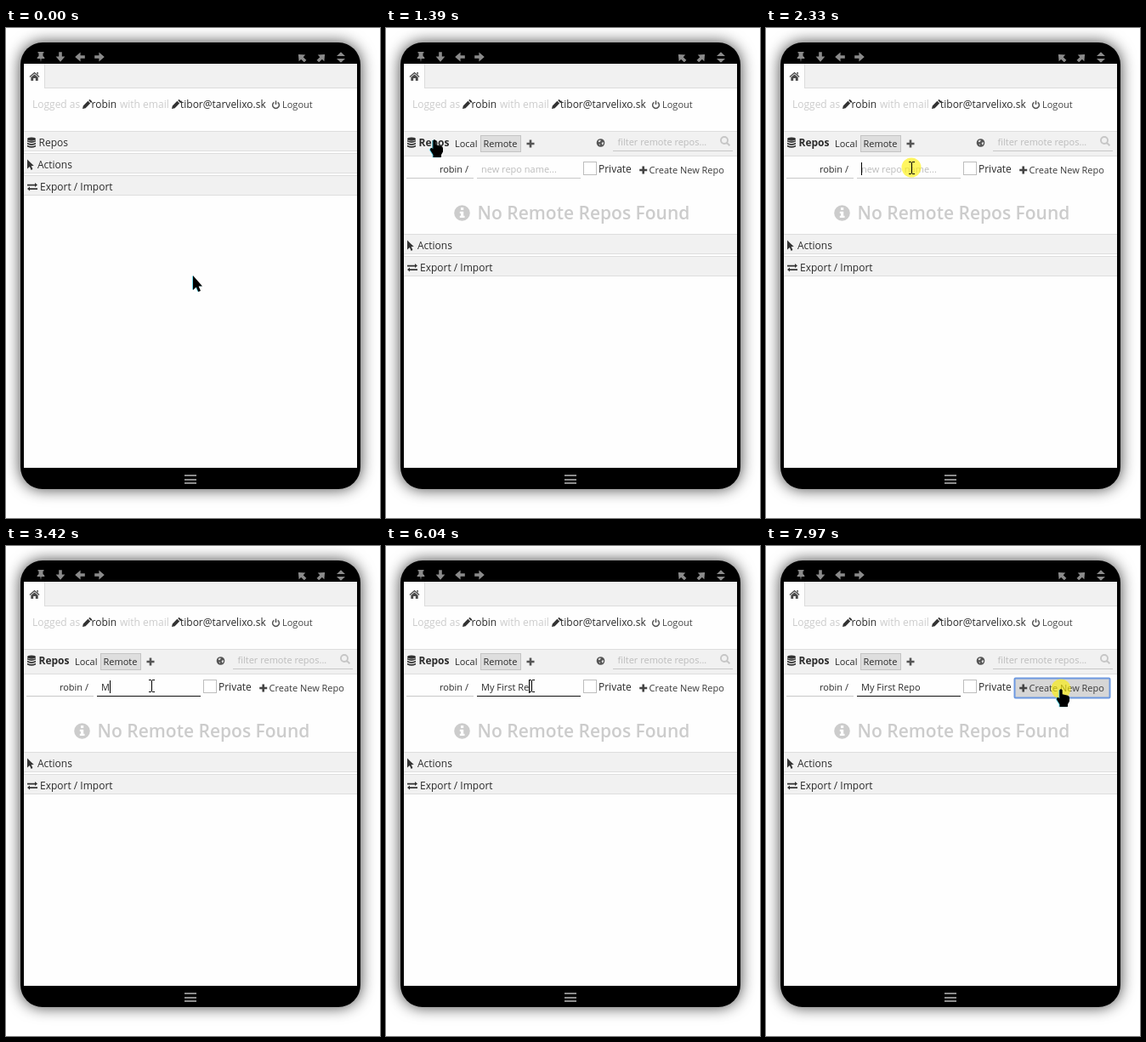
Animation of 440 by 576 pixels, one loop 8000 ms. Source, as an HTML page:

```html
<!DOCTYPE html>
<html lang="en">
<head>
<meta charset="utf-8">
<title>Repo panel</title>
<style>
  html, body { margin: 0; width: 100%; height: 100%; overflow: hidden; background: #fff; }
  svg { display: block; width: 440px; height: 576px; }
  text { font: 12px "Open Sans", sans-serif; white-space: pre; fill: #2b2b2b; }
  .s { font-size: 11px; }
  .b { font-weight: 700; }
  .pale { fill: #ccc; }
  .hint { fill: #bcbcbc; }
  .big { font-size: 21px; font-weight: 600; fill: #ccc; }
  .icon { fill: #333; }
  .bar { fill: #8b8b8b; }
  .crisp { shape-rendering: crispEdges; }
</style>
</head>
<body>
<svg viewBox="0 0 440 576" xmlns="http://www.w3.org/2000/svg">
  <defs>
    <filter id="glow" x="-20%" y="-20%" width="140%" height="140%">
      <feDropShadow dx="0" dy="0" stdDeviation="9" flood-color="#000" flood-opacity=".75"/>
    </filter>
    <path id="down" d="M-1.8-5.8h3.6v5.2H5.4L0 5.8-5.4-.6h3.6z"/>
    <path id="pencil" d="M-5 5l.8-3.6 5.6-5.6L4.2-1.4-1.4 4.2zM2.2-4.9l.9-.8q.6-.4 1.2.1l1.6 1.6q.5.6 0 1.2l-.9.9z"/>
    <path id="plus" d="M-1.3-4.5h2.6v3.2h3.2v2.6H1.3v3.2h-2.6V1.3h-3.2v-2.6h3.2z"/>
    <path id="band" d="M0 3.4q5 2.8 10 0v1.7q-5 2.8-10 0z"/>
    <g id="head" class="crisp">
      <rect x="21" width="392" height="24" fill="#f1f1f1"/>
      <path d="M21 .5h392M21 23.5h392" stroke="#dedede"/>
    </g>
    <path id="arrowShape" d="M0 0V17L3.8 13.4 6.3 19 9 17.9 6.6 12.4H11z"/>
    <path id="handShape" d="M-1.7 1.4Q0-.8 1.7 1.4V6.3L8 7.7Q10 8.3 10 10.5V14.5L8 18V21H-1.5V18L-5 12.4Q-5.3 9.4-3 10L-1.7 11.3z"/>
  </defs>

  <rect width="440" height="576" fill="#fff"/>
  <rect x="17" y="17" width="400" height="525" rx="26" filter="url(#glow)"/>
  <rect x="21" y="42" width="392" height="475" fill="#fefefe"/>

  <g class="bar">
    <path transform="translate(41 34)" d="M-3.5-6h7v1.5h-1v3.5q2 1 2 3H.7L0 6-.7 2H-4.5q0-2 2-3v-3.5h-1z"/>
    <use href="#down" transform="translate(64 34)"/>
    <use href="#down" transform="translate(87 34) rotate(90)"/>
    <use href="#down" transform="translate(110 34) rotate(-90)"/>
    <use href="#down" transform="translate(348 35) rotate(135)"/>
    <use href="#down" transform="translate(371 35) rotate(225)"/>
    <path transform="translate(394 34.5)" d="M-5-1.5L0-6.2 5-1.5zM-5 1.5H5L0 6.2z"/>
    <path d="M210 525h14v2h-14zM210 530h14v2h-14zM210 534h14v2h-14z"/>
  </g>

  <g class="crisp">
    <rect x="21" y="42" width="392" height="29" fill="#f1f1f1"/>
    <path d="M46 70.5H413M45.5 42V71" stroke="#dcdcdc"/>
    <rect x="21" y="42" width="24" height="29" fill="#fefefe"/>
  </g>
  <path transform="translate(33.5 57)" fill="#4a4a4a" d="M0-5.2l6 5.2-.8 1L0-3.5-5.2 1-6 0zM-4.2 1L0-2.6 4.2 1v4H1.3V2h-2.6v3h-2.9zM2.8-5h1.5v3L2.8-3.4z"/>

  <text class="pale" x="31" y="94">Logged as</text>
  <use href="#pencil" class="icon" x="95" y="90"/>
  <text x="100.5" y="94">robin</text>
  <text class="pale" x="134" y="94">with email</text>
  <use href="#pencil" class="icon" x="200" y="90"/>
  <text x="205" y="94">tibor@tarvelixo.sk</text>
  <path transform="translate(317.5 90.5)" d="M-2.2-3.2a3.9 3.9 0 1 0 4.4 0M0-5v4.6" fill="none" stroke="#555" stroke-width="1.5"/>
  <text class="s" x="325" y="94" style="fill:#444">Logout</text>

  <use id="shut" href="#head" y="121"/>
  <g id="panel">
    <g class="crisp">
      <rect x="21" y="121" width="392" height="30" fill="#f1f1f1"/>
      <path d="M21 121.5H413M21 150.5H413" stroke="#dedede"/>
      <path d="M267 144.5H408M24 176.5H103" stroke="#c8c8c8"/>
      <path id="line" d="M107 176.5H229"/>
      <rect id="remote" x="111.5" y="126.5" width="47" height="19" stroke="#c4c4c4"/>
      <rect x="232.5" y="157.5" width="15" height="15" fill="#fff" stroke="#bdbdbd"/>
    </g>
    <rect id="create" x="292.5" y="155.5" width="112" height="23" rx="1"/>
    <text class="s" x="81" y="140">Local</text>
    <text class="s" x="114.5" y="140">Remote</text>
    <use href="#plus" x="170" y="136" fill="#555"/>
    <g transform="translate(252.5 135)">
      <circle r="4.8" fill="#555"/>
      <path d="M-2.6-2.6l2-.8 1 1-1.6 1.6-1.4-.2zM1 .2l2-1.4.6 2-1.4 2zM-2 1.2l1.6.4-.6 1.6z" fill="#ddd"/>
    </g>
    <text class="s hint" x="272.5" y="138">filter remote repos...</text>
    <path d="M402 132a4 4 0 1 1-8 0 4 4 0 1 1 8 0M400.8 134.8l3.6 3.4" fill="none" stroke="#c6c6c6" stroke-width="1.9"/>
    <text class="s" x="97" y="170" text-anchor="end">robin /</text>
    <text class="s hint" id="hint" x="112" y="170">new repo name...</text>
    <text class="s" id="typed" x="112" y="170"></text>
    <rect class="crisp" id="caret" y="158" width="1" height="15"/>
    <text x="250" y="170">Private</text>
    <use href="#plus" x="302.7" y="167" fill="#444"/>
    <text class="s" x="309.5" y="171" style="fill:#3a3a3a">Create New Repo</text>
    <circle cx="89.5" cy="217.5" r="9.3" fill="#ccc"/>
    <path d="M88 211h3.2v3H88zM86.8 215.8h4.4v5h1.3v2.2h-5.7v-2.2H88v-2.8h-1.2z" fill="#fff"/>
    <text class="big" x="107.5" y="225">No Remote Repos Found</text>
  </g>

  <g class="icon" transform="translate(25 128.5)">
    <ellipse cx="5" cy="2.1" rx="5" ry="2.1"/>
    <use href="#band"/><use href="#band" y="2.9"/><use href="#band" y="5.8"/>
  </g>
  <text id="title" x="38.5" y="139">Repos</text>

  <g id="rest">
    <use href="#head" y="147"/>
    <path class="icon" transform="translate(25 154.5)" d="M0 0l7.8 7.6H4.7l1.7 4-1.8.8-1.7-4L0 11z"/>
    <text x="37" y="165">Actions</text>
    <use href="#head" y="173"/>
    <path class="icon" transform="translate(25 182)" d="M0 1.7h9V0l3 2.5L9 5V3.5H0zM12 6.2H3V4.6L0 7.1l3 2.5V8h9z"/>
    <text x="40" y="191">Export / Import</text>
  </g>

  <g id="mouse">
    <circle id="spot" r="11.5" fill="#fff000" fill-opacity=".62"/>
    <g id="arrow"><use href="#arrowShape" x="-.9" fill="#5fd6ea"/><use href="#arrowShape"/></g>
    <g id="hand"><use href="#handShape" x="-.9" y=".3" fill="#5fd6ea"/><use href="#handShape"/></g>
    <path id="beam" class="crisp" d="M-3-6.5H0M1-6.5H4M.5-6V7M-3 7.5H0M1 7.5H4" stroke="#000" fill="none"/>
  </g>
</svg>
<script>
const LOOP = 8000, STEP = 76.7;
const ui = {};
document.querySelectorAll('[id]').forEach(el => ui[el.id] = el);

const NAME = 'My First Repo';
const KEYS = [3420, 3660, 4130, 4590, 4750, 4810, 5040, 5210, 5500, 5820, 6040, 6270, 6350];

// pointer path: time, x, y
const PATH = [
  [0, 220, 291], [620, 220, 291], [780, 196, 258], [1007, 97, 153], [1160, 57, 131],
  [1560, 57, 131], [1630, 72, 115], [1707, 100, 108], [1783, 118, 134], [1940, 119, 135],
  [2090, 155, 156], [2170, 171, 164], [7290, 171, 164], [7360, 184, 170], [7437, 220, 181],
  [7590, 305, 184], [7667, 334, 176], [7820, 347, 168], [LOOP, 347, 168]
];

const within = (t, ...spans) => spans.some(([a, b]) => t >= a && t < b);
const show = (el, on) => el.setAttribute('display', on ? 'inline' : 'none');

// the pointer is sampled at a fixed rate, restarting with each move
function sampled(t) {
  const start = [7360, 1630, 700].find(s => t >= s);
  return start ? start + Math.floor((t - start + 8) / STEP) * STEP : 0;
}

function pointer(t) {
  const i = Math.max(1, PATH.findIndex(p => p[0] >= t));
  const [t0, x0, y0] = PATH[i - 1], [t1, x1, y1] = PATH[i];
  const k = (t - t0) / (t1 - t0);
  return [x0 + (x1 - x0) * k, y0 + (y1 - y0) * k].map(Math.round);
}

function draw(t) {
  const open = t >= 1310, clicked = t >= 7895, hover = t >= 7740;
  show(ui.shut, !open);
  show(ui.panel, open);
  ui.title.setAttribute('class', open ? 'b' : '');
  ui.rest.setAttribute('transform', `translate(0 ${open ? 95 : 0})`);

  ui.remote.setAttribute('fill', within(t, [1780, 2010]) ? '#bfbfbf' : '#dedede');
  ui.line.setAttribute('stroke', t >= 2490 ? '#111' : '#c8c8c8');
  ui.create.setAttribute('fill', clicked ? '#d6d6d6' : hover ? '#e4e4e4' : 'none');
  ui.create.setAttribute('stroke', clicked ? '#6c98e0' : hover ? '#ccc' : 'none');
  ui.create.setAttribute('stroke-width', clicked ? 2 : 1);

  const count = KEYS.filter(k => t >= k).length;
  ui.typed.textContent = NAME.slice(0, count);
  show(ui.hint, !count);
  show(ui.caret, within(t, [2250, 2870], [3420, 6900], [7437, 7895]));
  ui.caret.setAttribute('x', Math.round(112 + (count && open ? ui.typed.getComputedTextLength() : 0)));

  ui.mouse.setAttribute('transform', `translate(${pointer(Math.min(sampled(t), LOOP))})`);
  const hand = within(t, [1080, 1630], [1780, 2010]) || hover;
  const beam = within(t, [2085, 7510]);
  show(ui.hand, hand);
  show(ui.beam, beam);
  show(ui.arrow, !hand && !beam);
  show(ui.spot, within(t, [1160, 1390], [2250, 2410]) || clicked);
}

const begin = performance.now();
function tick() {
  draw((performance.now() - begin) % LOOP);
  requestAnimationFrame(tick);
}
tick();
</script>
</body>
</html>
```
